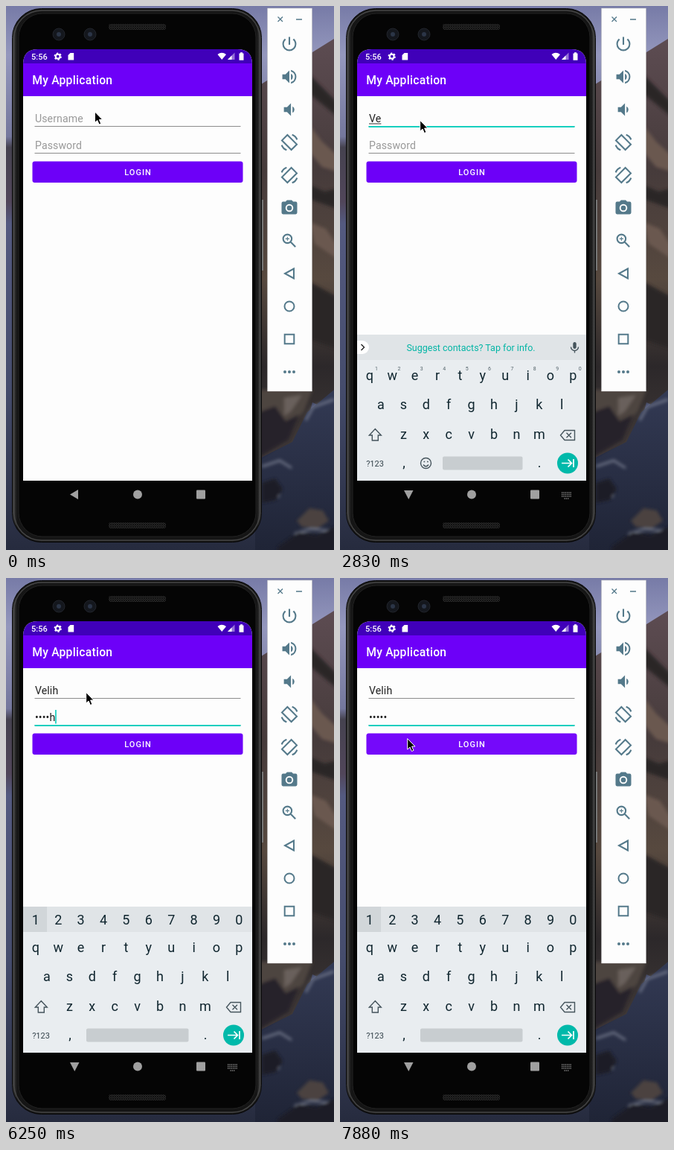
An HTML page for the animation above (8 s loop, 441x730 px).

```html
<!DOCTYPE html>
<html lang="en">
<head>
<meta charset="utf-8">
<title>Login demo</title>
<style>
html, body { margin: 0; width: 100%; height: 100%; overflow: hidden; }
svg { display: block; font-family: Roboto, Arial, sans-serif; }
.mid { text-anchor: middle; }
.field { font-size: 14.1px; letter-spacing: .1px; fill: #202020; white-space: pre; }
.hint { fill: #999; }
.key { font-size: 18px; fill: #10262f; }
.line { fill: none; stroke: #45545c; stroke-width: 1.4; }
</style>
</head>
<body>
<svg width="441" height="730" viewBox="0 0 441 730">
  <defs>
    <linearGradient id="sky" x2="0" y2="1">
      <stop offset="0" stop-color="#777ba7"/><stop offset=".09" stop-color="#9497bd"/>
      <stop offset=".24" stop-color="#74779c"/><stop offset=".26" stop-color="#45424f"/>
      <stop offset=".36" stop-color="#51465a"/><stop offset=".4" stop-color="#545a80"/>
      <stop offset=".7" stop-color="#454c6c"/><stop offset="1" stop-color="#262b3e"/>
    </linearGradient>
    <linearGradient id="cliff" x2="0" y2="1">
      <stop offset="0" stop-color="#5d4c52"/><stop offset=".3" stop-color="#463b3b"/>
      <stop offset=".55" stop-color="#57493f"/><stop offset=".75" stop-color="#2c282a"/>
      <stop offset="1" stop-color="#463e3b"/>
    </linearGradient>
    <linearGradient id="sea" x2="0" y2="1">
      <stop offset="0" stop-color="#333a54"/><stop offset="1" stop-color="#1f2436"/>
    </linearGradient>
    <linearGradient id="rim">
      <stop offset="0" stop-color="#444"/><stop offset=".02" stop-color="#151515"/>
      <stop offset=".98" stop-color="#151515"/><stop offset="1" stop-color="#3d3d3d"/>
    </linearGradient>
    <pattern id="mesh" width="3" height="3" patternUnits="userSpaceOnUse">
      <path fill="#292929" d="M0 0h3v3h-3z"/><path stroke="#111" d="M0 0l3 3M3 0L0 3"/>
    </pattern>
    <filter id="soft"><feGaussianBlur stdDeviation="2"/></filter>
    <clipPath id="screen"><path d="M23 637V78q0-20 20-20H311q20 0 20 20V637z"/></clipPath>
    <clipPath id="btnClip"><rect x="35.5" y="208.5" width="283" height="28.5" rx="3"/></clipPath>
  </defs>

  <path fill="url(#sky)" d="M0 0h441v730H0z"/>
  <path fill="url(#cliff)" d="M335 110L412 62 441 44V545L412 532 385 630 335 600z"/>
  <path fill="url(#sea)" d="M441 515L405 545 385 585 335 610V730H441z"/>
  <g filter="url(#soft)">
    <path fill="#6b5850" d="M408 160l17 22 20 18v22l-20-6-17-20zM408 290l22 9 15 22v18l-30-20z"/>
    <path fill="#2b2628" d="M408 92l37 37v19l-37-30zM408 240l20 9 17-4v27l-37-13zM408 370l37 20v70l-37-12z"/>
    <path fill="#4e443f" d="M340 515H412L400 545 376 568 340 584z"/>
    <path fill="#27242a" d="M340 545l22-8 14 20 18-9-14 34-40 24z"/>
    <path fill="#69605b" d="M374 526l24-4-15 22-9 6z"/>
    <path d="M441 528l-28 10-10 18M344 618l24-8 16 10M350 652l18 6M388 708l22-6 26 2" fill="none" stroke="#a3a8b8" stroke-width="3" opacity=".55"/>
    <path fill="#1e1e25" d="M344 640l18-6 10 14-9 15-19 4zM365 726l28-20 25 4 26-12v38h-79z"/>
    <path fill="#4c423f" d="M391 691l17-17 18 3 8 14-15 10-21-2z"/>
  </g>
  <path fill="#777" d="M342 260h4v95h-4z"/>

  <rect x="8.5" y="3.5" width="335" height="716" rx="39" fill="url(#rim)" stroke="#080808"/>
  <rect x="11" y="6" width="330" height="711" rx="37" fill="none" stroke="#464646" stroke-width="1.4"/>
  <rect x="17" y="10" width="319" height="702" rx="32" fill="#050505" stroke="#222"/>
  <rect x="138" y="24" width="77" height="8" rx="3" fill="url(#mesh)"/>
  <rect x="138" y="693" width="77" height="8" rx="3" fill="url(#mesh)"/>
  <g fill="#14171d" stroke="#22252c"><circle cx="71" cy="38" r="8"/><circle cx="113" cy="38" r="8"/></g>
  <g fill="#2b3547"><circle cx="71" cy="38" r="3"/><circle cx="113" cy="38" r="3"/></g>

  <g clip-path="url(#screen)">
    <path fill="#fdfdfd" d="M23 58h308v579H23z"/>
    <path fill="#4000b9" d="M23 58h308v19H23z"/>
    <path fill="#6d00f8" d="M23 77h308v44H23z"/>
    <g fill="#fff">
      <text x="34" y="72" font-size="11" font-weight="500">5:56</text>
      <text x="35.2" y="105" font-size="15.7" font-weight="500" letter-spacing=".25">My Application</text>
      <circle cx="69.7" cy="67.7" r="2.9" fill="none" stroke="#fff" stroke-width="2"/>
      <circle cx="69.7" cy="67.7" r="4.4" fill="none" stroke="#fff" stroke-width="1.6" stroke-dasharray="2.3"/>
      <path d="M83.5 66l3-3h4.7v9.5h-7.7z"/>
      <path d="M284.5 65q5.5-4.5 11.5 0l-5.75 7z"/>
      <path d="M298 72l9.5-9.5V72z" opacity=".45"/><path d="M298 72l5.5-5.5V72z"/>
      <path d="M313.5 63.5h1.5v-1.2h3v1.2h1.5v9.2h-6z"/>
    </g>

    <text class="field hint" id="userHint" x="39" y="156">Username</text>
    <text class="field hint" id="passHint" x="39" y="191.5">Password</text>
    <text class="field" id="user" x="39" y="156"></text>
    <text class="field" id="pass" x="39" y="191.5"></text>
    <path id="compose" fill="#303030"/>
    <path fill="#8c8c8c" d="M38.5 161H315.5v1H38.5zM38.5 197H315.5v1H38.5z"/>
    <rect id="focus" x="38.5" width="277" height="2" fill="#16cfbf"/>
    <rect id="caret" width="1.7" height="18.5" fill="#16cfbf"/>

    <rect id="shadow" x="36" y="211" width="282" height="28" rx="4" fill="#000" opacity=".15"/>
    <rect x="35.5" y="208.5" width="283" height="28.5" rx="3" fill="#6d00f8"/>
    <circle id="ripple" cy="220" fill="#9431fd" clip-path="url(#btnClip)"/>
    <text class="mid" x="177.5" y="227" font-size="11" font-weight="500" letter-spacing="1" fill="#fff">LOGIN</text>

    <g id="keyboard">
      <path fill="#e9edf0" d="M23 441h308v196H23z"/>
      <path fill="#e0e4e7" d="M23 441h308v34H23z"/>
      <g id="suggest">
        <path fill="#fff" d="M23 449h7a9 9 0 0 1 0 18h-7z"/>
        <path class="line" style="stroke:#222" d="M28.5 454l4 4-4 4"/>
        <text class="mid" x="176" y="463" font-size="12.5" fill="#00b5a5">Suggest contacts? Tap for info.</text>
        <rect x="313.3" y="451" width="4.4" height="9" rx="2.2" fill="#45545c"/>
        <path class="line" d="M310.5 457.5a5 5 0 0 0 10 0M315.5 462.5v3"/>
        <g class="line"><circle cx="115.5" cy="613.5" r="7"/><path d="M112 615.5q3.5 4.5 7 0M112.5 611.5h1.7M117 611.5h1.7"/></g>
      </g>
      <path id="numberCell" fill="#d1d6d9" d="M23 441h32v34H23z"/>
      <g id="keys"></g>
      <text class="mid" x="47" y="618" font-size="11" fill="#34434b">?123</text>
      <rect id="space" y="604.5" height="18" rx="2" fill="#c8cdd0"/>
      <path class="line" d="M47.3 567.5l8 8.5h-4v7h-8v-7h-4zM302 569.5h13.5v13H302l-5.5-6.5zM304.5 572.8l6.5 6.5M311 572.8l-6.5 6.5"/>
      <circle cx="306" cy="613.5" r="14" fill="#00b9aa"/>
      <path fill="none" stroke="#fff" stroke-width="1.7" d="M298 613.5h13M306.5 608.5l5 5-5 5M314 608v11"/>
    </g>
  </g>

  <g fill="#a0a0a0">
    <path id="back" d="M86 655.5l11-6.5v13z"/>
    <path id="down" d="M86 650h12.5l-6.25 12z"/>
    <circle cx="177" cy="655.5" r="6"/><rect x="256" y="649.5" width="12" height="12" rx="1"/>
    <path id="kbIcon" fill="none" stroke="#888" stroke-width="1.3" stroke-dasharray="1.3 1" d="M298 653h13M298 655.5h13M298 658h13M301.5 661h6"/>
  </g>

  <path fill="#fdfdfd" stroke="#bbb" stroke-width=".5" d="M351.5 3h60v514h-60z"/>
  <path fill="none" stroke="#54798a" stroke-width="1.3" d="M365.5 14.5l6.5 6.5M372 14.5l-6.5 6.5M390 18h8"/>
  <g id="tools" fill="#54798a"></g>

  <path id="mouse" d="M0 0V14.5L3.3 11.5 5.7 17 8.2 15.9 5.9 10.5H10.3Z" fill="#000" stroke="#fff" stroke-width="1"/>
</svg>

<script>
const $ = id => document.getElementById(id);
const show = (id, on) => $(id).style.display = on ? '' : 'none';
const set = (id, attrs) => { for (const k in attrs) $(id).setAttribute(k, attrs[k]); };

// Keyboard letters
const STEP = 30.4;
const row = (chars, x, y, cls = '') => [...chars].map((c, i) =>
  `<text class="mid key ${cls}" x="${x + i * STEP}" y="${y}">${c}</text>`).join('');
const digits = '1234567890';
$('keys').innerHTML =
  row('qwertyuiop', 39.8, 501.5) + row('asdfghjkl', 55, 541) + row('zxcvbnm', 85.4, 581) +
  row(',', 86, 619) + row('.', 268, 619) +
  `<g id="numbers">${row(digits, 39.8, 465)}</g>` +
  `<g id="minis">${row(digits, 49, 488.5, 'mini')}</g>`;
document.querySelectorAll('.mini').forEach(e => e.style.cssText = 'font-size:7px;fill:#56656c');

// Side panel icons on a 24-unit grid, 44px apart
const fill = d => `<path fill-rule="evenodd" d="${d}"/>`;
const stroke = d => `<path fill="none" stroke="#54798a" stroke-width="2" d="${d}"/>`;
const rotate = stroke('M2.5 9.5L9.5 2.5 21.5 14.5 14.5 21.5zM15.5 2.2a10 10 0 0 1 6.300 6.300M8.500 21.800a10 10 0 0 1-6.300-6.300');
const icons = [
  fill('M13 3h-2v10h2zm4.83 2.17l-1.42 1.42C17.99 7.86 19 9.81 19 12c0 3.87-3.13 7-7 7s-7-3.13-7-7c0-2.19 1.01-4.14 2.58-5.42L6.17 5.17C4.23 6.82 3 9.26 3 12a9 9 0 0 0 18 0c0-2.74-1.23-5.18-3.17-6.83z'),
  fill('M3 9v6h4l5 5V4L7 9zm13.5 3A4.5 4.5 0 0 0 14 7.97v8.05A4.5 4.5 0 0 0 16.5 12zM14 3.23v2.06a7 7 0 0 1 0 13.42v2.06a9 9 0 0 0 0-17.54z'),
  fill('M18.5 12A4.5 4.5 0 0 0 16 7.97v8.05A4.5 4.5 0 0 0 18.5 12zM5 9v6h4l5 5V4L9 9z'),
  rotate,
  `<g transform="matrix(-1 0 0 1 24 0)">${rotate}</g>`,
  fill('M9 2L7.17 4H4a2 2 0 0 0-2 2v12a2 2 0 0 0 2 2h16a2 2 0 0 0 2-2V6a2 2 0 0 0-2-2h-3.17L15 2zM12 7a5 5 0 0 1 0 10a5 5 0 0 1 0-10z') + '<circle cx="12" cy="12" r="3.2"/>',
  stroke('M15 9.5a5.5 5.5 0 1 0-11 0a5.5 5.5 0 1 0 11 0M13.5 13.5l6.3 6.3') + fill('M9 7h1v2h2v1h-2v2H9v-2H7V9h2z'),
  stroke('M18 5.5v13L6 12z'),
  stroke('M18.5 12a6.5 6.5 0 1 0-13 0a6.5 6.5 0 1 0 13 0z'),
  stroke('M5.7 5.7h12.6v12.6H5.7z'),
  [6, 12, 18].map(x => `<circle cx="${x}" cy="12" r="2"/>`).join('')
];
$('tools').innerHTML = icons.map((icon, i) =>
  `<g transform="translate(381 ${51 + i * 44}) scale(${i < 7 ? 1.05 : 1}) translate(-12 -12)">${icon}</g>`).join('');

// Timelines: [start in ms, value], held until the next entry
const LOOP = 8000;
const at = (list, t) => list.reduce((v, [start, value]) => t >= start ? value : v, list[0][1]);
const NAME = 'Velih';
const userText = [[0, 0], [1940, 1], [2380, 2], [2980, 3], [3270, 4], [3420, 5]];
const passText = [[0, ''], [4750, 'V'], [5200, '•e'], [6100, '•••i'], [6250, '••••h'], [7880, '•••••']];
const caretOn = [[0, 0], [600, 1], [1040, 0], [1640, 1], [2830, 0], [2980, 1], [4010, 0], [4600, 1],
  [5650, 0], [6100, 1], [6700, 0], [7290, 1], [7880, 0]];
const mousePos = [[0, [119.5, 142]], [150, [112, 148]], [300, [107.7, 153.5]],
  [6700, [103, 215]], [6850, [94, 273]], [6990, [90.7, 215.5]]];
const keyboardDrop = [[0, 200], [1790, 70], [1940, 0]];
const ripples = [[0, [0, 0, 0]], [7440, [108, 75, .85]], [7580, [130, 140.5, 1]],
  [7730, [177, 160, .65]], [7880, [177, 160, .2]]];

function draw(t) {
  const name = NAME.slice(0, at(userText, t)), secret = at(passText, t);
  const inUser = t >= 600 && t < 3560, inPass = t >= 3560, numbers = t >= 3710;
  $('user').textContent = name;
  $('pass').textContent = secret;
  show('userHint', !name);
  show('passHint', !secret);

  const width = id => $(id).textContent ? $(id).getComputedTextLength() : 0;
  show('compose', inUser && name);
  set('compose', { d: `M39 157.5h${width('user')}v1H39z` });
  show('focus', inUser || inPass);
  set('focus', { y: inPass ? 197 : 161, opacity: t < 740 ? .6 : 1 });
  show('caret', at(caretOn, t));
  set('caret', { x: 38.8 + width(inPass ? 'pass' : 'user'), y: inPass ? 177 : 141.5 });

  const [cx, r, opacity] = at(ripples, t);
  set('ripple', { cx, r, opacity });
  show('shadow', t >= 7440 && t < 7880);

  set('keyboard', { transform: `translate(0 ${at(keyboardDrop, t)})` });
  show('suggest', !numbers);
  show('minis', !numbers);
  show('numbers', numbers);
  show('numberCell', numbers);
  const left = numbers ? 108 : 138;
  set('space', { x: left, width: 245.5 - left });

  show('back', t < 1340);
  show('down', t >= 1340);
  show('kbIcon', t >= 1340);
  set('mouse', { transform: `translate(${at(mousePos, t)})` });
}

const begin = performance.now();
function tick() {
  draw((performance.now() - begin) % LOOP);
  requestAnimationFrame(tick);
}
tick();
</script>
</body>
</html>
```
